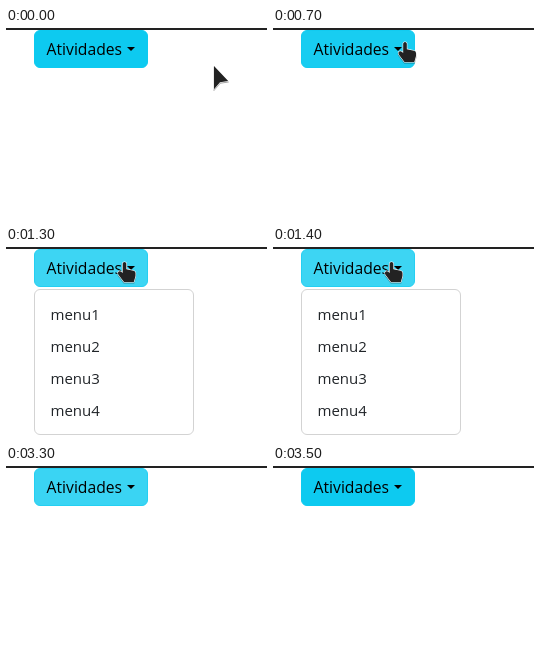
An HTML page that plays this animation: 261x191 px, repeating every 4500 ms.

```html
<!DOCTYPE html>
<html lang="pt">
<head>
<meta charset="utf-8">
<title>Dropdown</title>
<style>
  html, body { margin: 0; width: 100%; height: 100%; overflow: hidden; background: #fff; }
  svg { display: block; width: 100vw; height: 100vh; }
  text { font: 15px "Open Sans", "Noto Sans", sans-serif; fill: #212529; }
  #label { font-size: 15.7px; fill: #000; }
  .cursor { fill: #222; stroke: #fff; stroke-width: 1.2; stroke-linejoin: round; paint-order: stroke;
    filter: drop-shadow(.5px 1px .7px rgba(0, 0, 0, .35)); }
</style>
</head>
<body>
<svg viewBox="0 0 261 191">
  <rect width="261" height="2" fill="#222"/>
  <rect id="button" x="28.5" y="2.5" width="113" height="37" rx="5.5"/>
  <text id="label" x="40.6" y="27">Atividades</text>
  <path d="M121 19h8l-4 4z"/>
  <g id="menu">
    <rect x="28.5" y="42.5" width="159" height="145" rx="5.5" fill="#fff" stroke="#d3d3d3"/>
    <text x="44.5" y="73">menu1</text>
    <text x="44.5" y="105">menu2</text>
    <text x="44.5" y="137">menu3</text>
    <text x="44.5" y="169">menu4</text>
  </g>
  <path id="arrow" class="cursor" d="M0 0V23.2L6 16.2 14.2 15z"/>
  <path id="hand" class="cursor" d="M-1.8 1.5Q-1.6 0 0 0T1.8 1.6V7.2L9 8.8Q11 9.3 11 11V14L9.3 20H-.5L-6.2 12.4Q-7.2 10.6-5.8 9.6T-3.3 9.8L-1.8 11z"/>
</svg>
<script>
  const LOOP = 4500, STEP = 100;
  const el = id => document.getElementById(id);
  const [button, menu, arrow, hand] = ["button", "menu", "arrow", "hand"].map(el);
  const show = (node, on) => node.setAttribute("visibility", on ? "visible" : "hidden");
  const place = (node, x, y) => node.setAttribute("transform", `translate(${x} ${y})`);
  const mix = (a, b, k) => `rgb(${a.map((v, i) => Math.round(v + (b[i] - v) * k))})`;

  const BASE = [13, 202, 240], HOVER = [61, 213, 243], EDGE = [37, 207, 242];

  // [time, hover amount], held until the next entry
  const hover = [[0, 0], [700, .23], [800, .75], [900, 1], [3300, .94], [3400, .44], [3500, 0]];
  // [time, x, y] of the pointer tip
  const pointer = [[0, 208, 38], [500, 196, 35], [600, 163, 25], [700, 132, 14], [800, 119, 15], [900, 118.5, 15]];
  const at = (list, t) => list.filter(e => e[0] <= t).pop();

  function draw(now) {
    const t = Math.floor(now % LOOP / STEP) * STEP;
    const k = at(hover, t)[1], [, x, y] = at(pointer, t);
    button.setAttribute("fill", mix(BASE, HOVER, k));
    button.setAttribute("stroke", mix(BASE, EDGE, k));
    show(menu, t >= 1300 && t < 3000);
    show(arrow, t < 700);
    show(hand, t >= 700 && t < 3300);
    place(arrow, x, y);
    place(hand, x, y);
  }

  const start = performance.now();
  (function tick() {
    draw(performance.now() - start);
    requestAnimationFrame(tick);
  })();
</script>
</body>
</html>
```
